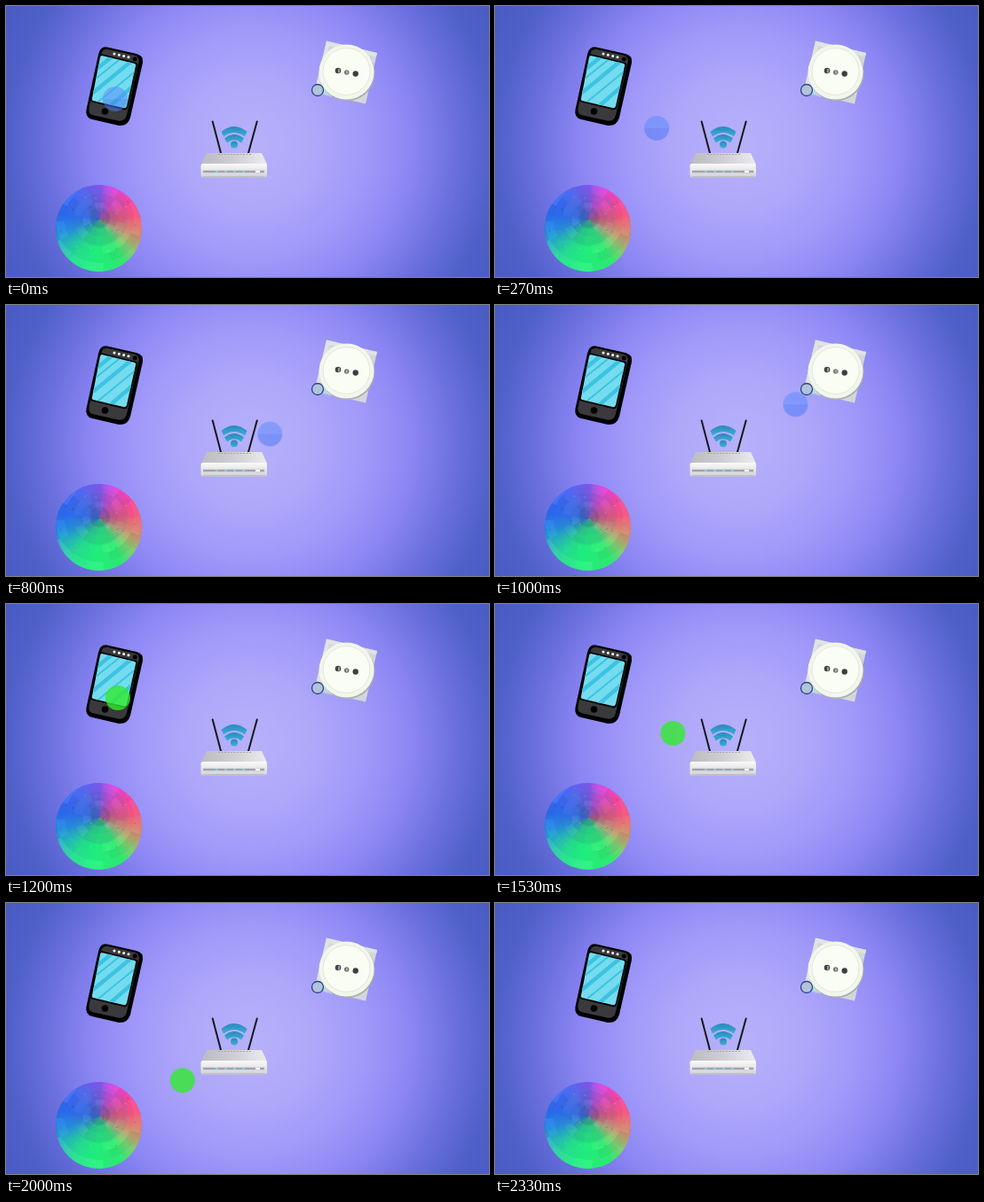
Animation of 544 by 306 pixels, one loop 2.39 s. Source, as an HTML page:

```html
<!DOCTYPE html>
<html lang="en">
<head>
<meta charset="utf-8">
<title>Smart home signals</title>
<style>
html, body { margin: 0; width: 100%; height: 100%; overflow: hidden; }
body {
  position: relative;
  background: radial-gradient(circle at 276px 156px,
    #b7b1fa 0, #afa8fa 70px, #a099f9 130px, #8c86f4 180px, #6b70de 230px, #4f60c9 275px, #485bc3 320px);
}
.lamp {
  position: absolute; left: 55.5px; top: 202px; width: 97.5px; height: 97.5px; border-radius: 50%;
  background:
    radial-gradient(circle at 51% 38%, #3a588a80 0 10px, #3f689840 13px 20px, #46749f24 21px 31px, #fff0 33px),
    conic-gradient(from 0deg at 51% 40%,
      #7d56ea 0deg, #cb4ae4 18deg, #ee46cf 34deg, #f74a9e 60deg, #f2557c 85deg, #d97a6e 105deg,
      #bfa470 121deg, #7bd372 136deg, #2fec72 152deg, #20f27c 185deg, #25e08e 213deg,
      #26bcb8 233deg, #2590e0 252deg, #2c6cf5 278deg, #4768f2 320deg, #7d56ea 360deg);
}
svg { position: absolute; left: 0; top: 0; display: block; }
.ball { animation: 2390ms -4ms infinite; }
.blue { animation-name: blue; }
.green { animation-name: green; }
@keyframes blue {
  0% { transform: translate(123px, 105px); opacity: 1; animation-timing-function: steps(9); }
  25% { transform: translate(256px, 179px); opacity: 1; animation-timing-function: steps(8); }
  47.221% { opacity: 1; }
  47.222%, 100% { transform: translate(366px, 90px); opacity: 0; }
}
@keyframes green {
  0%, 47.221% { opacity: 0; }
  0%, 47.222% { transform: translate(111px, 98px); animation-timing-function: steps(10); }
  47.222% { opacity: 1; }
  75% { transform: translate(260px, 178px); opacity: 1; animation-timing-function: steps(8); }
  97.221% { opacity: 1; }
  97.222%, 100% { transform: translate(97px, 237.5px); opacity: 0; }
}
</style>
</head>
<body>
<div class="lamp"></div>
<svg width="544" height="306" viewBox="0 0 544 306">
  <defs>
    <clipPath id="screen"><path d="M108 56 145 65Q147 66 146 68L136 113Q135 116 132 115L98 107Q96 106 97 104L106 58Q106.500 56 108 56Z"/></clipPath>
    <clipPath id="disc"><circle cx="104.250" cy="250.750" r="48.750"/></clipPath>
    <linearGradient id="lid" x2="1"><stop stop-color="#bcbcc0"/><stop offset=".5" stop-color="#cfcfd3"/><stop offset="1" stop-color="#ececee"/></linearGradient>
    <linearGradient id="front" x2="0" y2="1"><stop stop-color="#fafafa"/><stop offset="1" stop-color="#d2d2d6"/></linearGradient>
    <linearGradient id="wave" x2="0" y2="1"><stop stop-color="#2a88bd"/><stop offset="1" stop-color="#3bb0d6"/></linearGradient>
    <linearGradient id="blueFill" x2="0" y2="1">
      <stop offset=".5" stop-color="#5a8cff" stop-opacity=".52"/><stop offset=".5" stop-color="#4a78f4" stop-opacity=".52"/>
    </linearGradient>
  </defs>

  <g id="facets" clip-path="url(#disc)"></g>

  <path d="M114 46.500 147 54Q155 56 154 64L140 126Q137 136 127 135L97 128Q89 126 90.500 117L104 55Q106 45 114 46.500Z"/>
  <path d="M115 49 144 55.500Q151 57 149.500 63.500L136 123Q134 131 126 129.500L99 123.500Q92 122 93.500 115L107 55Q108.500 47.500 115 49Z" fill="#3a3a3c"/>
  <path d="M107 54 147 64Q149 65 148 68L137 115Q136 118 132 117L97 108.500Q94.500 108 95 105L104.500 57Q105 53.500 107 54Z"/>
  <g clip-path="url(#screen)">
    <rect x="94" y="52" width="56" height="66" fill="#74dcee"/>
    <g stroke="#3dc3e2">
      <path d="M96 76 126 52M98 98 144 60M116 114 146 88" stroke-width="4.500"/>
      <path d="M96 86 136 54M104 108 148 72" stroke-width="2"/>
    </g>
  </g>
  <path d="M122 54 138 57.700" stroke="#fff" stroke-width="3" stroke-linecap="round" stroke-dasharray="0 5.470"/>
  <circle cx="145.200" cy="60" r="2.500"/>
  <circle cx="111.500" cy="119" r="3.800"/>

  <path d="M361 39.500 418 53 405 110.500 347.500 97Z" fill="#d3d7da"/>
  <path d="M361 39.500 418 53 417 57 364 45 352 98 347.500 97Z" fill="#dfe3e4"/>
  <path d="M355 90 368 97 367 103 356 100Z" fill="#b3d8de" opacity=".6"/>
  <circle cx="384.500" cy="76" r="31" fill="#a9afaf"/>
  <circle cx="383.500" cy="74.500" r="31" fill="#f3f6ec"/>
  <circle cx="383.500" cy="74" r="26.500" fill="#fafdf4" stroke="#e2e7dd"/>
  <circle cx="374" cy="73" r="3.300" fill="#454446"/>
  <circle cx="383.700" cy="75" r="2.800" fill="#77786f"/>
  <circle cx="393.700" cy="76.500" r="3.200" fill="#3d3d42"/>
  <path d="M375 71v4.500M384 73.500v3" stroke="#d3d5c9" stroke-width="1.200"/>
  <circle cx="351" cy="95" r="6.500" fill="#b4c3da" stroke="#274a86" stroke-width="1.300"/>

  <path d="M232.700 130.500 242 166M282.700 130.500 273 166" stroke="#17171c" stroke-width="2" stroke-linecap="round"/>
  <g fill="url(#wave)">
    <path d="M242.500 142Q257 130 271.500 142L269 147.500Q257 138.500 245 147.500Z"/>
    <path d="M246 149.500Q257 140.500 268 149.500L265 154.500Q257 148 249 154.500Z"/>
    <circle cx="257" cy="156.500" r="4"/>
  </g>
  <path d="M226 166H288L294 179H220Z" fill="url(#lid)"/>
  <path d="M239 167.500H276" stroke="#a4a4aa" stroke-dasharray="2 1.500"/>
  <rect x="219.500" y="178" width="74.500" height="15.500" rx="2.500" fill="url(#front)"/>
  <path d="M222 187H291" stroke="#a0a3aa" stroke-width="2.600"/>
  <path d="M236 187H270" stroke="#7fd0e0" stroke-width="2" stroke-dasharray="3 7"/>
  <path d="M281 187H286" stroke="#fff" stroke-width="2"/>
  <path d="M222 192.800H292" stroke="#b5b5bb"/>

  <circle class="ball blue" r="14" fill="url(#blueFill)"/>
  <circle class="ball green" r="14" fill="#32ea2e" fill-opacity=".8"/>
</svg>
<script>
const facets = document.getElementById('facets');
let seed = 7;
const rand = () => (seed = seed * 16807 % 2147483647) / 2147483647;
const at = (a, r) => `${(105 + Math.cos(a) * r).toFixed(1)} ${(241 + Math.sin(a) * r).toFixed(1)}`;

function add(d, color, opacity) {
  const path = document.createElementNS('http://www.w3.org/2000/svg', 'path');
  path.setAttribute('d', d);
  path.setAttribute('fill', color);
  path.setAttribute('fill-opacity', opacity);
  facets.append(path);
}

// soft tinted tiles in rings
for (let r = 9; r < 62; r += 10) {
  const n = 10 + Math.floor(r / 8);
  for (let i = 0; i < n; i++) {
    const a = i / n * Math.PI * 2 + r, b = a + Math.PI * 2 / n, o = r + 10;
    add(`M${at(a, r)}L${at(a, o)}A${o} ${o} 0 0 1 ${at(b, o)}L${at(b, r)}A${r} ${r} 0 0 0 ${at(a, r)}Z`,
      rand() < .5 ? '#fff' : '#124', rand() * .07);
  }
}
// specks
for (let i = 0; i < 30; i++) {
  const p = at(rand() * 6.28, Math.sqrt(rand()) * 46);
  add(`M${p}h1v1h-1z`, rand() < .3 ? '#dff' : '#1c2c58', .4);
}
</script>
</body>
</html>
```
